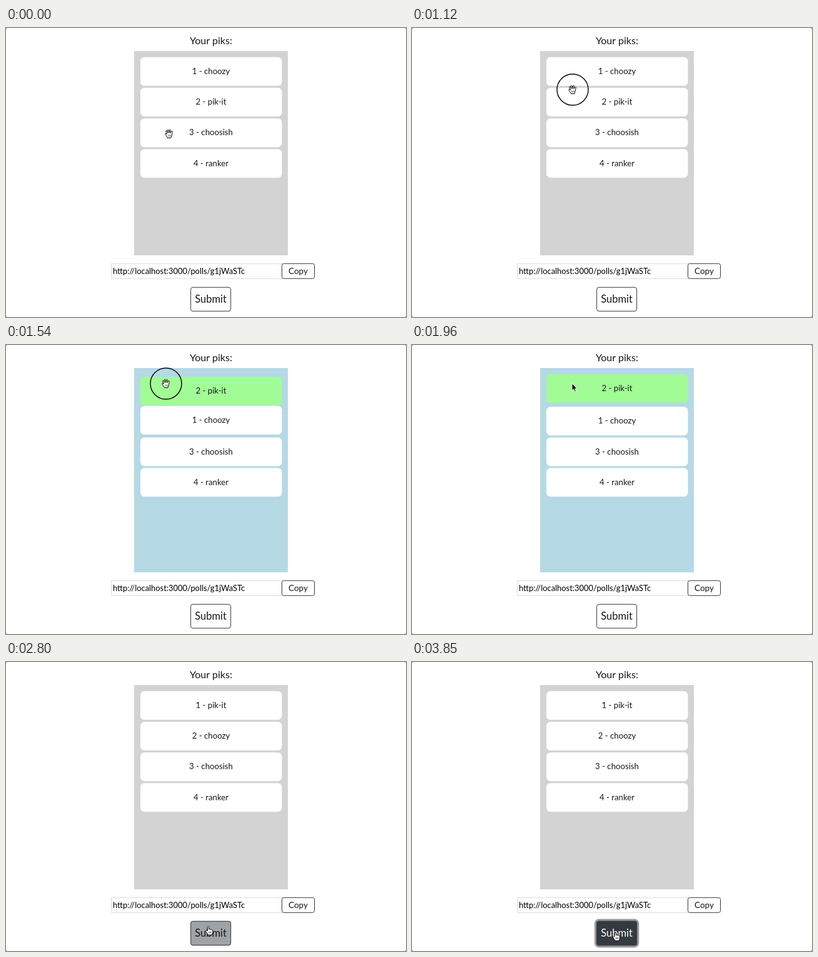
These frames come from a looping animation (640 by 464 pixels, 4690 ms). An HTML page:

```html
<!DOCTYPE html>
<html lang="en">
<head>
<meta charset="utf-8">
<title>Your piks</title>
<style>
  html, body { margin: 0; width: 100%; height: 100%; overflow: hidden; background: #888; }
  svg { display: block; font: 13.2px Lato, sans-serif; fill: #16181b; }
  text { text-anchor: middle; }
  .outlined { fill: #fff; stroke: #343a40; }
  #cursor path { stroke: #000; fill: #fff; stroke-linejoin: round; }
  #cursor #arrow { fill: #000; stroke: #fff; }
</style>
</head>
<body>
<svg width="640" height="464" viewBox="0 0 640 464">
  <rect width="640" height="464" rx="3" fill="#fff"/>
  <text x="328" y="26.3" font-size="16.1">Your piks:</text>
  <rect id="panel" x="205" y="37" width="246" height="328"/>
  <g id="cards"></g>

  <rect x="168.5" y="378.5" width="274" height="24" fill="#fff" stroke="#ddd"/>
  <text x="171" y="394.5" font-size="12.9" fill="#000" style="text-anchor:start">http://localhost:3000/polls/g1jWaSTc</text>
  <rect class="outlined" x="441.5" y="378.3" width="52" height="24" rx="3"/>
  <text x="467.5" y="395" font-size="13.5">Copy</text>

  <rect id="ring" fill="#999"/>
  <rect class="outlined" x="295.6" y="416.3" width="64" height="38.4" rx="3.5"/>
  <rect id="hover" x="295.1" y="415.8" width="65" height="39.4" rx="4" fill="#343a40"/>
  <text id="submit" x="327.6" y="441.2" font-size="16.5">Submit</text>

  <g id="cursor">
    <circle id="press" r="25" fill="none" stroke="#000" stroke-width="1.4"/>
    <g id="hand">
      <path d="M-2.5 6.5C-3.5 4-6 1.5-6.3 .3C-6.3-.9-4.8-.9-3.6 .8L-5.2-4C-5.4-5.3-3.7-5.6-3.2-4.3L-2.2-1.5L-2.6-5.6C-2.6-7-.8-7-.6-5.6L-.2-1.8L.5-5.9C.9-7.2 2.6-6.8 2.4-5.5L2-1.4L3.6-4C4.4-5 5.8-4.2 5.3-3C4.3-.5 5 2 3.5 4.5L3 6.5Z"/>
      <path d="M-1.2 1.5V4.5M.6 1.5V4.5M2.4 1.5V4.5" stroke-width=".6"/>
    </g>
    <path id="arrow" d="M0 0V11.6L2.6 9.2L4.5 13.6L6.4 12.8L4.6 8.5H8.2Z"/>
    <g id="pointer">
      <path d="M-1.5 7V1C-1.5-.7 .9-.7 .9 1V4.5C1.3 3.6 3 3.8 3.1 5C3.6 4.2 5 4.5 5.1 5.6C5.8 5 7 5.4 7 6.6V9C7 11 5.8 11.5 5.8 13.5H-.5C-.8 12-3 10-4 8C-4.6 6.8-2.8 5.8-1.5 7Z"/>
      <path d="M1 8V11M2.7 8V11M4.4 8V11" stroke-width=".6"/>
    </g>
  </g>
</svg>
<script>
const LOOP = 4690, STEP = 70;
const TOP = 46.8, PITCH = 49.2, GAP = 3.2;
const DRAG = 1190, SWAP = 1400, RELEASE = 1680, DROPPED = 2100;
const HOVER = 2730, CLICK = 3570, CLICK_END = 3800, LAG = 140;

// time, x, y of the cursor's hot spot
const route = [
  [0, 261, 170], [70, 261, 168], [350, 258, 136], [560, 257, 119.5], [630, 257, 118],
  [980, 257, 118], [1050, 257, 110], [1120, 257, 99], [1190, 257, 93], [1330, 257, 78],
  [1540, 256, 62], [2030, 256, 61.5], [2100, 260, 73], [2310, 300, 233],
  [2590, 317, 376], [2730, 323, 420], [2940, 325.5, 434]
];

const $ = id => document.getElementById(id);
const progress = (t, start, length) => Math.min(1, Math.max(0, (t - start) / length));
const easeOut = p => 1 - (1 - p) ** 3;
const show = (id, visible) => $(id).style.display = visible ? '' : 'none';
const setAll = (el, attrs) => { for (const k in attrs) el.setAttribute(k, attrs[k]); };

function cursorAt(t) {
  const next = route.findIndex(stop => stop[0] > t);
  if (next < 0) return route.at(-1).slice(1);
  const [a, b] = [route[next - 1], route[next]];
  const p = progress(t, a[0], b[0] - a[0]);
  return [a[1] + (b[1] - a[1]) * p, a[2] + (b[2] - a[2]) * p];
}

// The dragged card comes last so that it stays on top.
const cards = [['choozy', 0], ['choosish', 2], ['ranker', 3], ['pik-it', 1]].map(([name, slot]) => {
  const group = document.createElementNS('http://www.w3.org/2000/svg', 'g');
  group.innerHTML = '<rect x="215" width="226.5" height="46" rx="6.5"/><text x="328" y="27.3"></text>';
  $('cards').append(group);
  return { name, slot, group, box: group.firstChild, label: group.lastChild };
});

function dragOffset(t) {
  const held = cursorAt(Math.min(t, RELEASE) - LAG)[1] - 118;
  return held + (-PITCH - held) * easeOut(progress(t, RELEASE, 300));
}

function drawCards(t) {
  const dragging = t >= DRAG && t < DROPPED;
  const done = t >= DROPPED;
  $('panel').setAttribute('fill', dragging ? '#b5d9e5' : '#d3d3d3');
  for (const { name, slot, group, box, label } of cards) {
    const lifted = dragging && slot === 1;
    const rank = done && slot < 2 ? 1 - slot : slot;
    let y = TOP + PITCH * rank;
    if (lifted) y += dragOffset(t);
    else if (dragging && slot > 1) y += GAP;
    else if (dragging) y += (PITCH + GAP) * easeOut(progress(t, SWAP, 200));
    group.setAttribute('transform', `translate(0 ${y})`);
    box.setAttribute('fill', lifted ? '#a1fc96' : '#fff');
    label.textContent = `${rank + 1} - ${name}`;
  }
}

function drawSubmit(t) {
  const hover = progress(t, HOVER, 150);
  $('hover').setAttribute('opacity', hover);
  $('submit').setAttribute('fill', hover > .5 ? '#fff' : '#16181b');
  const focus = progress(t, CLICK, 150), spread = 3.2 * focus;
  setAll($('ring'), {
    x: 295.1 - spread, y: 415.8 - spread, rx: 4 + spread,
    width: 65 + 2 * spread, height: 39.4 + 2 * spread, opacity: focus
  });
}

function drawCursor(t) {
  const [x, y] = cursorAt(t);
  const dropping = t >= RELEASE && t < DROPPED;
  const overCard = y > TOP && y < TOP + 4 * PITCH;
  const overSubmit = y > 416;
  $('cursor').setAttribute('transform', `translate(${x} ${y})`);
  show('hand', overCard && !dropping);
  show('pointer', overSubmit);
  show('arrow', dropping || !overCard && !overSubmit);
  show('press', t >= 770 && t < RELEASE || t >= CLICK && t < CLICK_END);
}

function frame(now) {
  const t = Math.floor(now % LOOP / STEP) * STEP;
  drawCards(t);
  drawSubmit(t);
  drawCursor(t);
  requestAnimationFrame(frame);
}
requestAnimationFrame(frame);
</script>
</body>
</html>
```
